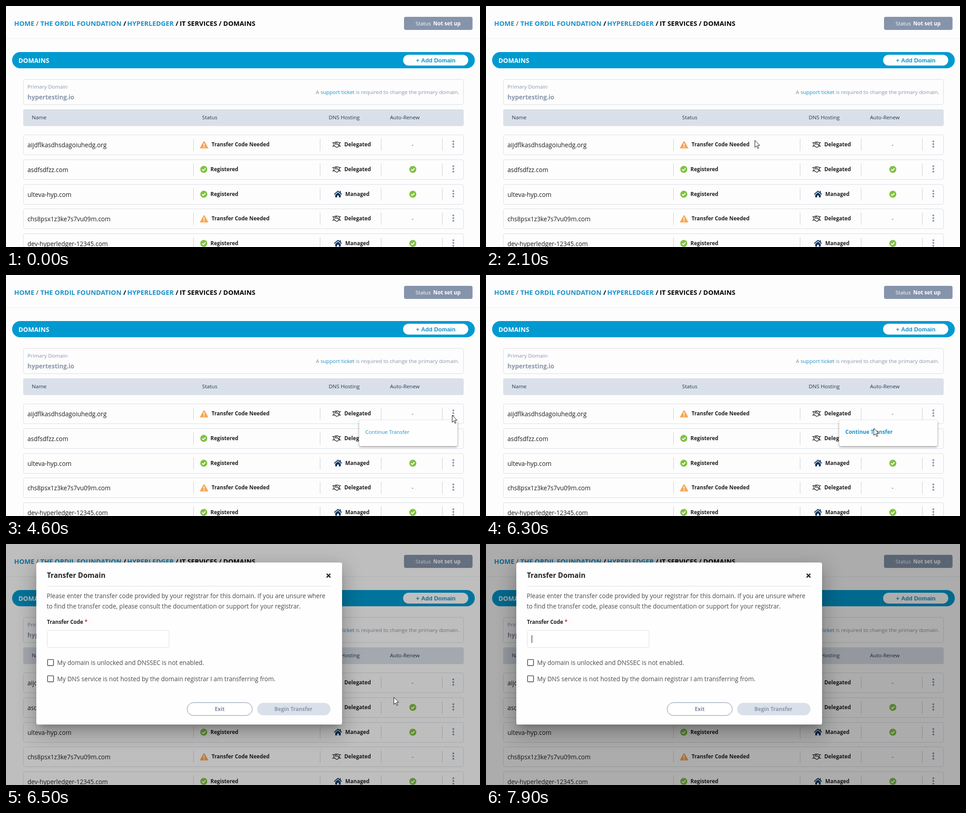
An HTML page with a canvas for the animation above (8 s loop, 1048 by 534 pixels).

```html
<!DOCTYPE html>
<html lang="en">
<head>
<meta charset="utf-8">
<title>Domains</title>
<style>
html, body { margin: 0; width: 100%; height: 100%; overflow: hidden; background: #fdfdfd; }
canvas { display: block; }
</style>
</head>
<body>
<canvas id="stage" width="1048" height="534"></canvas>
<script>
const ctx = document.getElementById('stage').getContext('2d');
const LOOP = 8000;
const SANS = '"Open Sans", sans-serif';
const SMALL = 11.65, MEDIUM = 13.6;
const BLUE = '#1a92c9', GREY = '#8794aa', LINE = '#d8dde6', DARK = '#222';

const MENU_AT = 4600, HOVER_AT = 5400, MODAL_AT = 6400, CARET_AT = 7900;
const BACKDROP = [0.135, 0.25, 0.3, 0.32];

// Pointer: time, x, y; it is hidden while it rests on text.
const POINTER = [
  [500, 142, 91], [600, 61, 200], [700, 99, 284],
  [900, 110, 300], [1000, 140, 317], [1100, 190, 323], [1200, 260, 318],
  [1300, 340, 310], [1400, 405, 305], [1500, 444, 302], [1600],
  [2100, 594, 297], [2300, 610, 295], [2400, 660, 297], [2500, 720, 300],
  [2600, 775, 302], [2700, 809, 303], [2900, 860, 303], [3000, 925, 303],
  [3100, 964, 303], [3300, 969, 307], [3400, 974, 312], [3500, 978, 315],
  [3700, 982, 316], [3900, 977, 319], [4000, 981, 320], [4100, 985, 315],
  [4200, 986, 310], [5100, 976, 317], [5200, 950, 328], [5300, 916, 338],
  [5400, 885, 343], [5500, 865, 341], [5600, 857, 339],
  [6900, 590, 275], [7000, 311, 226], [7100]
];

const ROWS = [
  { y: 285, name: 'aijdflkasdhsdagoiuhedg.org', pending: true },
  { y: 340, name: 'asdfsdfzz.com' },
  { y: 395, name: 'ulteva-hyp.com', managed: true },
  { y: 449, name: 'chs8psx1z3ke7s7vu09m.com', pending: true },
  { y: 504, name: 'dev-hyperledger-12345.com', managed: true }
];

function text(str, x, y, size, color, weight = 400, family = SANS) {
  ctx.font = `${weight} ${size}px ${family}`;
  ctx.fillStyle = color;
  ctx.fillText(str, x, y);
  return x + ctx.measureText(str).width;
}

function box(x, y, w, h, r, fill, stroke, width = 1) {
  ctx.beginPath();
  ctx.roundRect(x, y, w, h, r);
  if (fill) { ctx.fillStyle = fill; ctx.fill(); }
  if (stroke) { ctx.strokeStyle = stroke; ctx.lineWidth = width; ctx.stroke(); }
}

function rect(x, y, w, h, color) {
  ctx.fillStyle = color;
  ctx.fillRect(x, y, w, h);
}

// Runs a drawing step with the origin moved to x, y.
function at(x, y, draw) {
  ctx.save();
  ctx.translate(x, y);
  draw();
  ctx.restore();
}

function strokePath(d, color, width) {
  ctx.strokeStyle = color;
  ctx.lineWidth = width;
  ctx.stroke(new Path2D(d));
}

function fillPath(d, color) {
  ctx.fillStyle = color;
  ctx.fill(new Path2D(d));
}

function shadow(x, y, w, h, r, dy, blur, spread, alpha) {
  const far = 3000;
  ctx.save();
  ctx.shadowColor = `rgba(0,0,0,${alpha})`;
  ctx.shadowBlur = blur;
  ctx.shadowOffsetX = far;
  ctx.shadowOffsetY = dy;
  box(x - spread - far, y - spread, w + 2 * spread, h + 2 * spread, r, '#000');
  ctx.restore();
}

function disc(x, y, r, color) {
  ctx.beginPath();
  ctx.arc(x, y, r, 0, Math.PI * 2);
  ctx.fillStyle = color;
  ctx.fill();
}

function check(x, y) {
  disc(x, y, 7.8, '#80c242');
  at(x, y, () => strokePath('M-3.7 .2 L-1.1 2.8 L3.7 -2.2', '#fff', 2));
}

function warning(x, y) {
  at(x, y, () => {
    ctx.lineJoin = 'round';
    const tri = 'M0 -7 L8 7 H-8 Z';
    fillPath(tri, '#f9a550');
    strokePath(tri, '#f9a550', 2);
    rect(-1, -3, 2, 5.2, '#fff');
    disc(0, 4.7, 1.2, '#fff');
  });
}

function handshake(x, y) {
  at(x, y, () => {
    ctx.lineJoin = 'round';
    strokePath('M.5 3 H4 V10.5 H.5 M19.5 3 H16 V10.5 H19.5 M4 3.5 L7 1.5 H13 L16 3.5' +
      'M4 10 H5.5 L9 12.8 Q10.5 14 12 12.8 L15 10.2 H16' +
      'M10.2 1.8 L6.8 5 Q7.5 7.4 10 5.8 L11.3 5 L15 9', DARK, 1.4);
  });
}

function house(x, y) {
  at(x, y, () => {
    strokePath('M.7 8.2 L9 1.2 L17.3 8.2', '#0c3562', 1.9);
    rect(12.9, 1, 2.2, 4.5, '#0c3562');
    fillPath('M9 4.2 L15 9.2 V15 H10.9 V11 H7.1 V15 H3 V9.2 Z', '#0c3562');
  });
}

function drawHeader() {
  const size = 14.6, y = 44;
  const crumb = (str, x, color, weight = 700) => text(str, x, y, size, color, weight);
  crumb('HOME', 18, BLUE);
  crumb('/', 66.5, '#333', 400);
  crumb('THE ORDIL FOUNDATION', 76, BLUE);
  crumb('/', 259.5, '#000');
  crumb('HYPERLEDGER', 268, BLUE);
  crumb('/', 375, '#000');
  crumb('IT SERVICES / DOMAINS', 384, '#000');

  box(880, 24, 151.5, 29, 4, '#8594ab');
  text('Status', 905.5, 43, SMALL, '#fff');
  text('Not set up', 944.5, 43, SMALL, '#fff', 700);
  rect(0, 72, 1048, 1, '#e8ebef');

  box(13.5, 102, 1023, 36, 18, '#009ad0');
  text('DOMAINS', 27.5, 125.5, 14, '#fff', 700);
  box(878, 108, 144, 24, 12, '#fff');
  text('+ Add Domain', 906.5, 124.5, 12.95, '#1193c8', 700, '"Liberation Sans", Arial, sans-serif');

  box(38.5, 162.5, 973, 56, 4, null, LINE);
  text('Primary Domain', 47.5, 183, SMALL, GREY);
  text('hypertesting.io', 47.5, 206.5, MEDIUM, GREY, 700);
  let x = text('A ', 685, 195, SMALL, GREY);
  x = text('support ticket', x, 195, SMALL, BLUE);
  text(' is required to change the primary domain.', x, 195, SMALL, GREY);

  box(38, 229, 974, 37, 4, '#dae0e9');
  [['Name', 57], ['Status', 433.5], ['DNS Hosting', 713.5], ['Auto-Renew', 849]]
    .forEach(([label, left]) => text(label, left, 251, SMALL, '#243852'));
}

function drawRow({ y, name, pending, managed }) {
  const mid = y + 22, base = y + 26;
  box(38.5, y + 0.5, 973, 44, 4, null, LINE);
  [414, 694, 829, 964].forEach(x => rect(x, y + 9, 1, 27, '#c9ced6'));
  text(name, 47.5, base + 1.5, MEDIUM, '#1e1e1e');

  if (pending) {
    warning(438, mid + 0.5);
    text('Transfer Code Needed', 454.5, base, SMALL, DARK, 700);
    text('-', 897, base, SMALL, DARK);
  } else {
    check(437.3, mid);
    text('Registered', 452, base, SMALL, DARK, 700);
    check(899.5, mid);
  }

  if (managed) {
    house(725, mid - 8);
    text('Managed', 750, base, SMALL, DARK, 700);
  } else {
    handshake(721, mid - 7);
    text('Delegated', 748, base, SMALL, DARK, 700);
  }
  for (let i = -1; i <= 1; i++) disc(989, mid - 1 + i * 6, 2, '#7893b3');
}

function drawMenu(hover) {
  const frame = [781, 322, 217, 57, 4];
  shadow(...frame, 2, 5, 0, 0.4);
  box(...frame, '#fefefe');
  text('Continue Transfer', 794.5, 351.5, SMALL, BLUE, hover ? 700 : 400);
}

function drawModal(t) {
  const step = Math.min(BACKDROP.length - 1, Math.floor((t - MODAL_AT) / 100));
  rect(0, 0, 1048, 534, `rgba(0,0,0,${BACKDROP[step]})`);

  const frame = [67, 41, 676, 359, 4];
  shadow(...frame, 11, 15, -7, 0.2);
  shadow(...frame, 23, 37, 3, 0.14);
  shadow(...frame, 9, 45, 8, 0.12);
  box(...frame, '#fefefe');

  text('Transfer Domain', 90.5, 75, 15.55, DARK, 700);
  strokePath('M709 66 L717.2 74.2 M717.2 66 L709 74.2', '#111', 2.4);
  rect(91, 93, 628, 1, '#dcdcdc');

  const ink = '#4a4a4a';
  text('Please enter the transfer code provided by your registrar for this domain. If you are unsure where', 90, 119.5, MEDIUM, ink);
  text('to find the transfer code, please consult the documentation or support for your registrar.', 90, 143, MEDIUM, ink);
  const x = text('Transfer Code ', 90.5, 176.5, SMALL, DARK, 700);
  text('*', x, 176.5, SMALL, '#e5252a', 700);

  box(91.5, 191.5, 269, 38, 4, '#fff', '#dedede');
  if (t >= CARET_AT) rect(101, 202, 1, 17, '#000');

  [['My domain is unlocked and DNSSEC is not enabled.', 256],
   ['My DNS service is not hosted by the domain registrar I am transferring from.', 292]]
    .forEach(([label, y]) => {
      box(91.8, y, 13.4, 13.4, 1.5, null, '#555', 1.6);
      text(label, 113, y + 11.5, MEDIUM, ink);
    });

  box(400.5, 351.5, 144, 28.5, 14.2, '#fff', '#7b8aa5');
  text('Exit', 461.5, 370, SMALL, '#7f8da6', 700);
  box(555.5, 352, 162, 27.5, 13.7, '#dae0e9');
  text('Begin Transfer', 593.5, 370, SMALL, '#8b98ad', 700);
}

function drawPointer(t) {
  const spot = POINTER.findLast(p => p[0] <= t);
  if (!spot || spot.length < 3) return;
  at(spot[1] + 0.5, spot[2] + 0.7, () => {
    const arrow = 'M0 0 V15.6 L3.6 12.2 L6.2 18 L8.5 17 L6 11.2 H10.8 Z';
    ctx.lineJoin = 'miter';
    fillPath(arrow, '#fff');
    strokePath(arrow, '#111', 1);
  });
}

function render(now) {
  const t = now % LOOP;
  rect(0, 0, 1048, 534, '#fdfdfd');
  drawHeader();
  ROWS.forEach(drawRow);
  if (t >= MENU_AT && t < MODAL_AT) drawMenu(t >= HOVER_AT);
  if (t >= MODAL_AT) drawModal(t);
  drawPointer(t);
}

const start = performance.now();
function tick() {
  render(performance.now() - start);
  requestAnimationFrame(tick);
}
tick();
</script>
</body>
</html>
```
